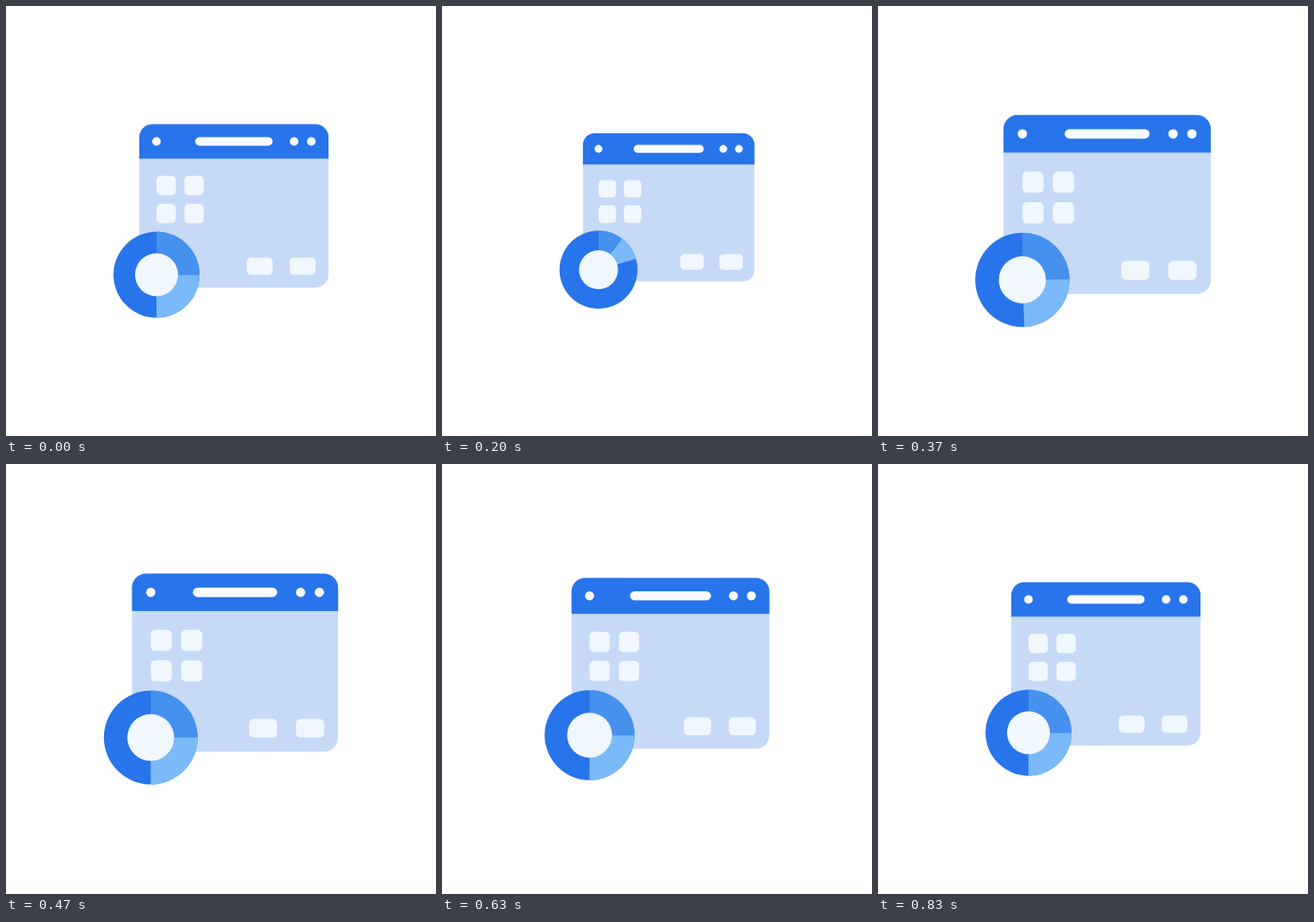
Write an HTML page that moves like this. It is 500 px wide and 500 px high and loops after 1010 ms.

```html
<!DOCTYPE html>
<html lang="en">
<head>
<meta charset="utf-8">
<title>Dashboard pulse</title>
<style>
  html, body { margin: 0; width: 100%; height: 100%; overflow: hidden; background: #fff; }
  svg { display: block; width: 100%; height: 100%; }
</style>
</head>
<body>
<svg viewBox="0 0 500 500">
  <!-- drawn around the stage centre so the whole icon scales from there -->
  <g id="icon">
    <rect x="-95" y="-112.5" width="220" height="190" rx="15" fill="#c6daf7"/>
    <path d="M-95 -72.5V-97.5a15 15 0 0 1 15 -15H110a15 15 0 0 1 15 15V-72.5Z" fill="#2874eb"/>
    <g fill="#f7faff">
      <circle cx="-75" cy="-92.5" r="5"/>
      <rect x="-30" y="-97.5" width="90" height="10" rx="5"/>
      <circle cx="85" cy="-92.5" r="5"/>
      <circle cx="105" cy="-92.5" r="5"/>
    </g>
    <g fill="#f0f7ff">
      <rect x="-75" y="-52.5" width="22.5" height="22.5" rx="5"/>
      <rect x="-42.5" y="-52.5" width="22.5" height="22.5" rx="5"/>
      <rect x="-75" y="-20" width="22.5" height="22.5" rx="5"/>
      <rect x="-42.5" y="-20" width="22.5" height="22.5" rx="5"/>
      <rect x="30" y="42.5" width="30" height="20" rx="5"/>
      <rect x="80" y="42.5" width="30" height="20" rx="5"/>
    </g>
    <g transform="translate(-75 62.5)">
      <circle r="50" fill="#2874eb"/>
      <path id="light" fill="#7bbaf8"/>
      <path id="mid" fill="#4791ee"/>
      <circle r="25" fill="#f0f7ff"/>
    </g>
  </g>
</svg>
<script>
const LOOP = 1010;
const [icon, light, mid] = ['icon', 'light', 'mid'].map(id => document.getElementById(id));

// Keys: frame, scale, share of the slices; x1 and x2 shape the ease to the next key.
const keys = [
  { at: 0, scale: 1, share: 1, x1: 0.333, x2: 0.667 },
  { at: 5, scale: 0.9, share: 0.39, x1: 0.49, x2: 0.42 },
  { at: 12, scale: 1.1, share: 1, x1: 0.167, x2: 0.833 },
  { at: 25, scale: 1, share: 1 }
];

// Cubic bezier (x1, 0, x2, 1), solved by bisection.
function ease(u, x1, x2) {
  let lo = 0, hi = 1;
  for (let i = 0; i < 30; i++) {
    const t = (lo + hi) / 2, r = 1 - t;
    if (3 * r * r * t * x1 + 3 * r * t * t * x2 + t * t * t < u) lo = t;
    else hi = t;
  }
  return lo * lo * (3 - 2 * lo);
}

function pose(frame) {
  const f = Math.min(frame, 25);
  const i = f < 5 ? 0 : f < 12 ? 1 : 2;
  const a = keys[i], b = keys[i + 1];
  const v = ease((f - a.at) / (b.at - a.at), a.x1, a.x2);
  const mix = name => a[name] + (b[name] - a[name]) * v;
  return { scale: mix('scale'), share: mix('share') };
}

function slice(from, to) {
  const point = deg => {
    const q = deg * Math.PI / 180;
    return `${(50 * Math.sin(q)).toFixed(3)} ${(-50 * Math.cos(q)).toFixed(3)}`;
  };
  return `M0 0L${point(from)}A50 50 0 0 1 ${point(to)}Z`;
}

function draw(ms) {
  // 30 frames a second, with starts rounded to 10 ms
  const frame = Math.floor((ms / 10 + 0.5) * 0.3);
  const { scale, share } = pose(frame);
  icon.setAttribute('transform', `translate(250 250) scale(${scale})`);
  mid.setAttribute('d', slice(0, 90 * share));
  light.setAttribute('d', slice(90 * share, 180 * share));
}

let start;
function tick(now) {
  start ??= now;
  draw(Math.max(0, now - start) % LOOP);
  requestAnimationFrame(tick);
}
draw(0);
requestAnimationFrame(tick);
</script>
</body>
</html>
```
